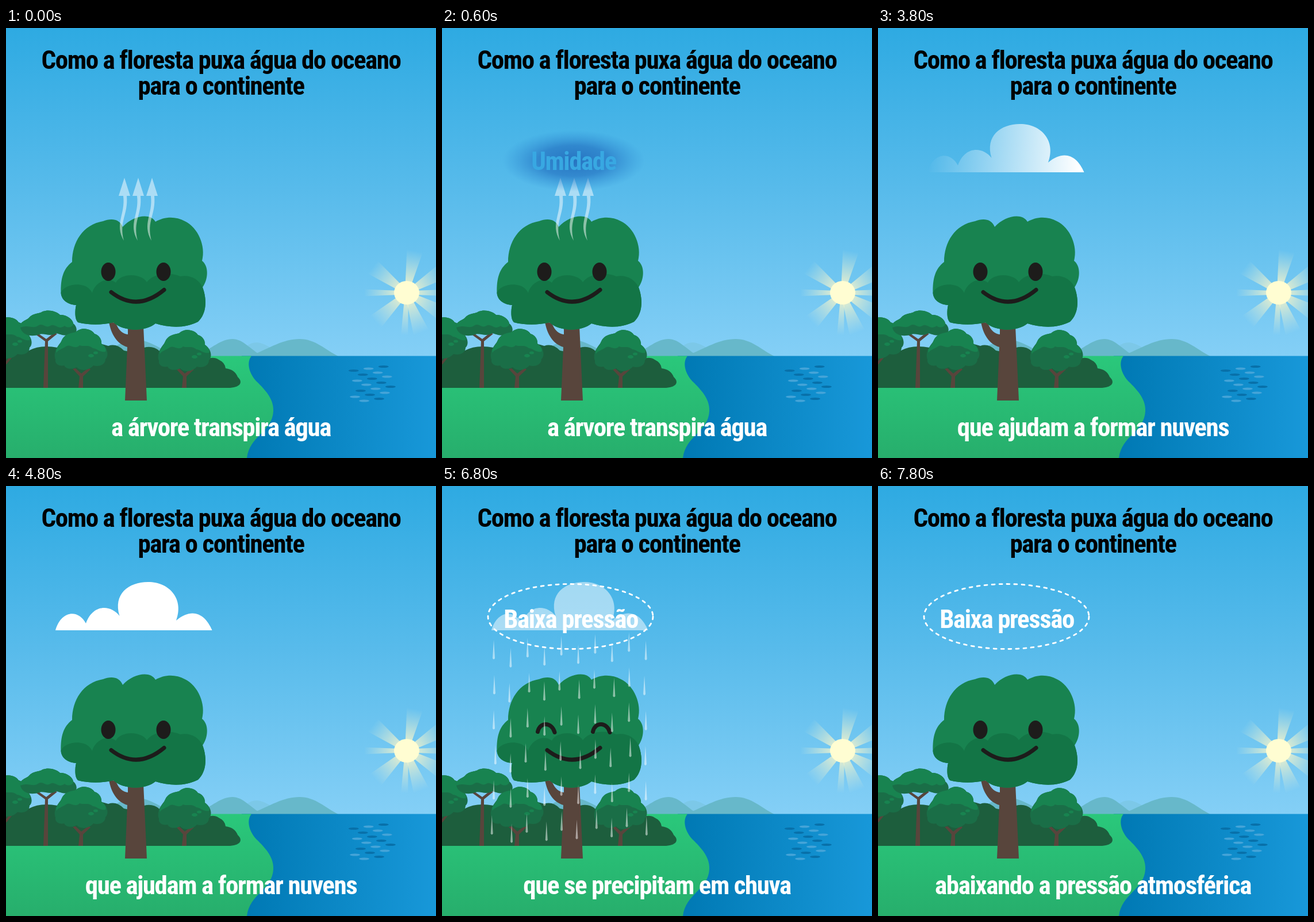
These frames come from a looping animation (748 px wide and 748 px high, 8 s). An HTML page with a canvas:

```html
<!DOCTYPE html>
<html lang="pt">
<head>
<meta charset="utf-8">
<title>Floresta e água</title>
<style>
html, body { margin: 0; width: 100%; height: 100%; overflow: hidden; }
canvas { display: block; }
</style>
</head>
<body>
<canvas id="stage" width="748" height="748"></canvas>
<script>
const ctx = document.getElementById('stage').getContext('2d');
const LOOP = 8000;
const LEAF = '#188350', SHADE = '#137546', FAR_SHADE = '#1a6e47';
const BROWN = '#58453c', INK = '#1d1c1b', YELLOW = '#fdf500';
const FONT = 'bold condensed 45px "Roboto Condensed", Roboto, "Open Sans", sans-serif';

// Evenly scattered value from -1 to 1
const scatter = (i, step = .618) => (i * step % 1) * 2 - 1;

function fill(d, color) {
  ctx.fillStyle = color;
  ctx.fill(new Path2D(d));
}

function stroke(d, color, width) {
  ctx.strokeStyle = color;
  ctx.lineWidth = width;
  ctx.lineCap = 'round';
  ctx.stroke(new Path2D(d));
}

function ellipse(x, y, rx, ry, color) {
  ctx.fillStyle = color;
  ctx.beginPath();
  ctx.ellipse(x, y, rx, ry, 0, 0, 2 * Math.PI);
  ctx.fill();
}

function linear(x0, y0, x1, y1, ...colors) {
  const g = ctx.createLinearGradient(x0, y0, x1, y1);
  colors.forEach((c, i) => g.addColorStop(i / (colors.length - 1), c));
  return g;
}

function label(text, x, y, color) {
  ctx.font = FONT;
  ctx.letterSpacing = '-1.45px';
  ctx.textAlign = 'center';
  ctx.fillStyle = color;
  ctx.fillText(text, x, y);
}

function withAlpha(alpha, draw) {
  ctx.save();
  ctx.globalAlpha = alpha;
  draw();
  ctx.restore();
}

function ray(angle, half) {
  ctx.save();
  ctx.translate(697, 460.5);
  ctx.rotate(angle * Math.PI / 180);
  fill(`M0 -3L74 ${-half}V${half}L0 3Z`,
    linear(16, 0, 74, 0, 'rgba(250,246,200,.8)', 'rgba(225,238,215,0)'));
  ctx.restore();
}

function sun() {
  for (const angle of [-79, -31, 30, 70, 137, 217]) ray(angle, 14);
  for (const angle of [0, 93, 180]) ray(angle, 6);
  ellipse(697, 460.5, 22, 20.5, '#fffdd2');
}

function ripples() {
  for (let i = 0; i < 18; i++) {
    ellipse(636 + 34 * scatter(i + 1.3), 589 + 3.5 * i, 9, 2, i % 2 ? '#45a4d8' : '#0870a9');
  }
}

function landscape() {
  ctx.fillStyle = linear(0, 0, 0, 571, '#2eaae2', '#58bbeb', '#84cff6');
  ctx.fillRect(0, 0, 748, 571);
  sun();
  fill('M400 571Q420 546 437 547Q455 549 480 571Z', '#7cc8e8');
  const hill = '#67b8ca';
  fill('M165 571C190 552 208 542 226 542S270 556 290 571Z', hill);
  fill('M330 571C360 556 374 541 394 541C412 541 424 558 446 571Z', hill);
  fill('M424 571C460 556 482 541 511 541C538 541 556 560 578 571Z', hill);
  ctx.fillStyle = linear(420, 0, 748, 0, '#0079b4', '#1898d9');
  ctx.fillRect(410, 570.5, 338, 178);
  ripples();
  fill('M0 570.5H427C419 580 421 598 435 614C455 633 466 648 465 667C463 702 424 709 419 748H0Z',
    linear(0, 571, 0, 748, '#2ac87b', '#27ae6c'));
}

function farCrown(x, y) {
  ctx.save();
  ctx.translate(x, y);
  fill('M-45 18C-50 2 -38 -8 -34 -15C-30 -27 -17 -28 -10 -30C0 -40 18 -36 23 -27C32 -25 35 -16 35 -10C47 -2 48 12 42 17C42 27 30 31 21 28C12 38 -2 38 -8 31C-17 36 -27 34 -30 28C-39 30 -46 25 -45 18Z', FAR_SHADE);
  fill('M-36 -11C-31 -28 -17 -28 -10 -30C0 -40 18 -36 23 -27C33 -24 36 -15 35 -10C42 -5 44 1 42 4C32 6 27 -2 20 -2C12 -9 5 -4 -3 -7C-11 1 -18 -9 -25 -6C-34 0 -41 1 -43 6C-46 0 -39 -6 -36 -11Z', LEAF);
  ellipse(17, 11, 5, 3, LEAF);
  ellipse(25, 6, 4, 2.5, LEAF);
  ctx.restore();
}

function forkedTree(x, y) {
  fill(`M${x - 4} 626L${x - 2} 606L${x - 14} 593L${x - 9} 592L${x + 1} 601L${x + 14} 591L${x + 17} 594L${x + 4} 606V626Z`, BROWN);
  farCrown(x + 1, y);
}

function umbrellaTree() {
  fill('M65 626L68 545L50 532L54 530L70 541L84 530L89 532L73 545V626Z', BROWN);
  const top = 'M25 521C22 511 37 508 40 504C47 495 58 498 64 493C75 489 88 493 94 499C107 499 116 507 117 514';
  fill(top + 'C126 521 124 535 114 532C104 538 93 532 87 531C78 538 64 530 58 533C45 538 28 535 25 521Z', FAR_SHADE);
  fill(top + 'C118 520 107 523 102 518C91 526 87 515 79 517C69 524 65 513 57 517C47 525 41 515 25 521Z', LEAF);
}

function forest() {
  fill('M0 556Q20 550 40 561Q60 550 90 556Q140 540 178 553Q192 548 205 561Q222 566 240 556Q256 552 267 562Q300 550 345 578Q360 570 370 577Q381 582 382 592Q398 594 403 607C413 616 408 626 386 626H0Z', '#1d5e3d');
  stroke('M0 583L8 573', BROWN, 4);
  farCrown(-1, 539);
  umbrellaTree();
  forkedTree(130, 559);
  forkedTree(310, 561);
}

function bigTree() {
  fill('M212 518H239L245 648H207L211 555C194 550 183 534 179 511L191 513C196 527 204 532 212 533Z', BROWN);
  const base = 'C350 473 349 497 334 511C313 522 286 522 260 514C242 529 203 528 187 512C167 517 144 517 125 512C119 506 120 490 122 482C107 481 96 473 95.5 460Z';
  fill('M95.5 460C95 437 99 419 115 407C115 372 134 342 169 336C182 331 197 331 203 346C221 326 251 321 260 337C275 328 295 327 311 336C334 347 348 379 341 405C353 414 352 437 342 451' + base, LEAF);
  fill('M95.5 460C101 449 119 443 135 448C141 450 146 453 150 461C154 444 175 431 191 443C199 427 233 425 245 442C257 426 286 424 303 432C321 429 335 437 342 451' + base, SHADE);
  stroke('M183 459.5Q228 494.5 275 455.5', INK, 7);
}

function openEyes() {
  for (const x of [178, 274]) ellipse(x, 424, 12.5, 16, INK);
}

function happyEyes() {
  for (const x of [181, 277]) stroke(`M${x - 14.5} 427.5C${x - 11} 410 ${x + 10} 410 ${x + 15} 428.5`, INK, 7);
}

function vapour() {
  for (const x of [206, 230, 254]) {
    fill(`M${x} 260.5L${x + 10} 292H${x + 4}C${x + 7} 325 ${x - 10} 335 ${x - 1} 370C${x - 18} 340 ${x + 2} 325 ${x - 2} 292H${x - 10}Z`, '#fff');
  }
}

function particles() {
  const count = 29;
  for (let i = 0; i < count; i++) {
    const rise = i / (count - 1);
    const x = 256 - 25 * rise + (6 + 78 * rise * rise) * scatter(i);
    const r = i % 5 === 3 ? 4.8 : 3.2;
    ellipse(x, 380 - 167 * rise ** .85, r, r, YELLOW);
  }
}

function humidity() {
  ctx.save();
  ctx.translate(229, 231);
  ctx.scale(1, .43);
  const g = ctx.createRadialGradient(0, 0, 0, 0, 0, 124);
  g.addColorStop(0, 'rgba(36,112,190,.95)');
  g.addColorStop(.5, 'rgba(38,118,196,.72)');
  g.addColorStop(1, 'rgba(46,140,212,0)');
  ellipse(0, 0, 124, 124, g);
  ctx.restore();
  label('Umidade', 229, 247, '#38a8e2');
}

function cloud(color) {
  fill('M86 251C96 216 126 214 139 239C151 205 182 206 197.5 226C186 188 213 167 247 167C285 167 310 197 296 234C324 211 346 222 358.5 251Z', color);
}

function rain() {
  for (let column = 0; column < 10; column++) {
    for (let row = 0; row < 6; row++) {
      const x = 90 + 29.4 * column + (row % 2) * 4 * scatter(column + row);
      const y = 303 + 61 * row + 16 * scatter(column + 1, .45);
      fill(`M${x} ${y - 34}L${x + 2} ${y - 2}Q${x} ${y + 2} ${x - 2} ${y - 2}Z`, '#fff');
    }
  }
}

function lowPressure() {
  ctx.strokeStyle = '#fff';
  ctx.lineWidth = 2.8;
  ctx.lineCap = 'round';
  ctx.setLineDash([5, 8]);
  ctx.beginPath();
  ctx.ellipse(223.5, 227, 143.5, 56.5, 0, 0, 2 * Math.PI);
  ctx.stroke();
  ctx.setLineDash([]);
  label('Baixa pressão', 224, 247, '#fff');
}

function caption(t) {
  if (t < 1800) return 'a árvore transpira água';
  if (t < 3800) return 'e também solta partículas';
  if (t < 5800) return 'que ajudam a formar nuvens';
  if (t < 7800) return 'que se precipitam em chuva';
  return 'abaixando a pressão atmosférica';
}

function draw(t) {
  const during = (from, to) => t >= from && t < to;
  const raining = during(5800, 7800);
  const fading = t < 6800 ? 1 : .5;
  landscape();
  forest();
  bigTree();
  if (raining) happyEyes(); else openEyes();
  if (t < 1200) withAlpha(.5, vapour);
  if (during(1800, 3800)) particles();
  if (during(600, 3800)) humidity();
  if (during(3800, 4800)) cloud(linear(86, 0, 350, 0, 'rgba(255,255,255,0)', '#fff'));
  if (during(4800, 7800)) withAlpha(fading, () => cloud('#fff'));
  if (raining) withAlpha(fading, rain);
  if (t >= 6800) lowPressure();
  label('Como a floresta puxa água do oceano', 374, 71, '#000');
  label('para o continente', 374, 116, '#000');
  label(caption(t), 374, 710, '#fff');
}

function tick(now) {
  draw(now % LOOP);
  requestAnimationFrame(tick);
}
requestAnimationFrame(tick);
</script>
</body>
</html>
```
